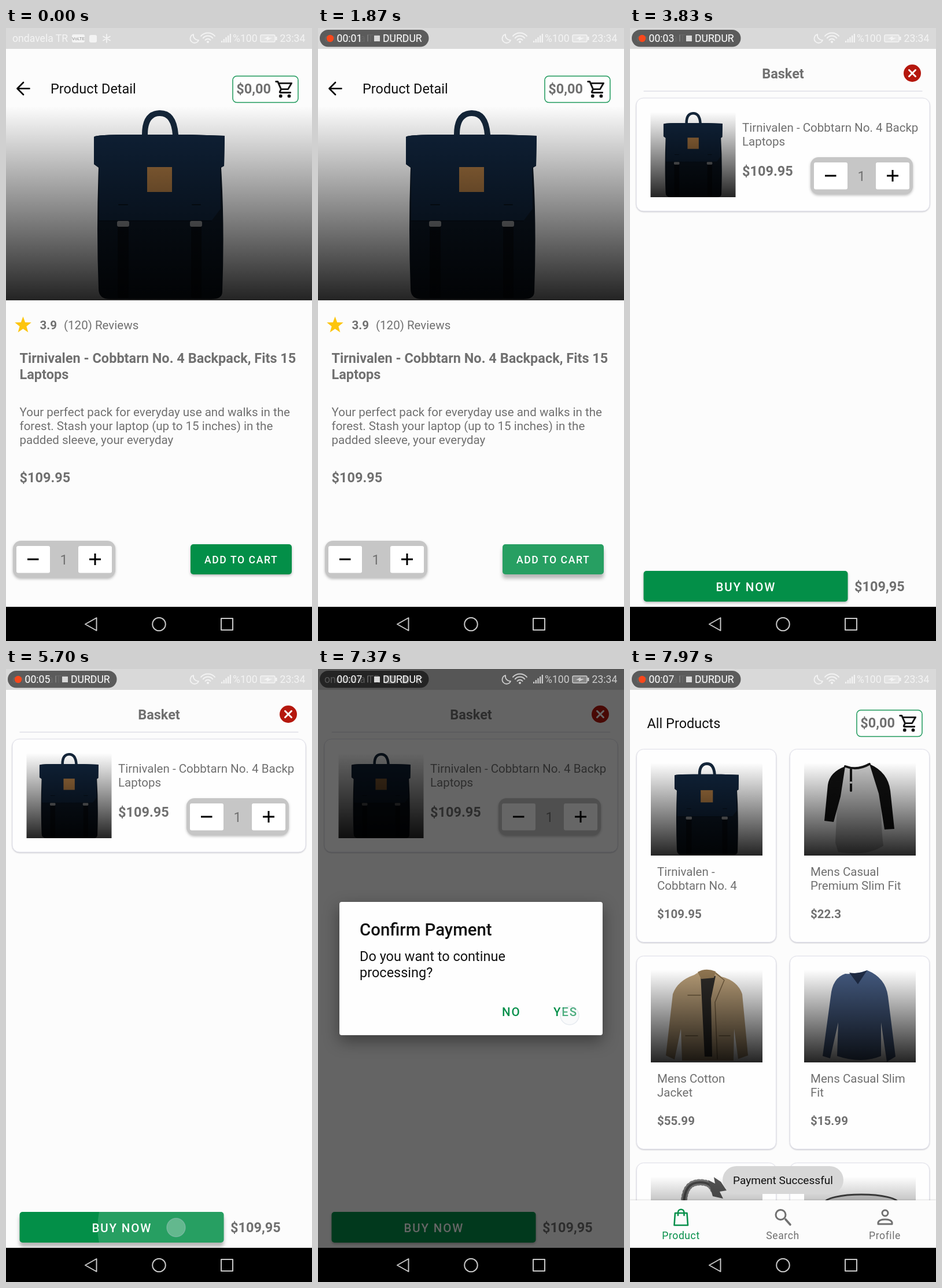
These frames come from a looping animation (529x1058 px, 8 s). An HTML page:

```html
<!DOCTYPE html>
<html lang="en">
<head>
<meta charset="utf-8">
<title>Shop checkout</title>
<style>
html, body { margin: 0; width: 100%; height: 100%; overflow: hidden; background: #000; }
svg { display: block; width: 529px; height: 1058px; font-family: Roboto, sans-serif; }
text { fill: #707070; white-space: pre; }
.b { font-weight: 700; }
.m { font-weight: 500; }
.dark { fill: #111; }
.green { fill: #07904b; }
.white { fill: #fff; }
.line { fill: none; stroke-linecap: round; stroke-linejoin: round; }
.card { fill: #fefefe; stroke: #e0e0ea; filter: drop-shadow(0 1px 1px rgba(0,0,30,.22)); }
.raised { filter: drop-shadow(0 2px 2px rgba(0,0,0,.25)); }
</style>
</head>
<body>
<svg id="stage" viewBox="0 0 529 1058"></svg>
<script>
const LOOP = 8000;
const SP = 1.469; // pixels per text unit
const BRAND = 'Tirnivalen', MODEL = 'Cobbtarn No. 4';

const text = (x, y, sp, str, attrs = '') =>
  `<text x="${x}" y="${y}" font-size="${sp * SP}" ${attrs}>${str}</text>`;
const rect = (x, y, w, h, r, attrs = '') =>
  `<rect x="${x}" y="${y}" width="${w}" height="${h}" rx="${r}" ${attrs}/>`;
const line = (d, color, width, attrs = '') =>
  `<path class="line" d="${d}" stroke="${color}" stroke-width="${width}" ${attrs}/>`;
const shape = (d, fill) => `<path d="${d}" fill="${fill}"/>`;
const circle = (x, y, r, attrs) => `<circle cx="${x}" cy="${y}" r="${r}" ${attrs}/>`;
const use = (id, transform) => `<use href="#${id}" transform="${transform}"/>`;
const shade = (x, y, w, h) => rect(x, y, w, h, 0, 'fill="url(#shade)"');
const page = (id, body) => `<g id="${id}">${rect(0, 0, 529, 999, 0, 'fill="#fcfcfc"')}${body}</g>`;

const button = (id, x, y, w, h, label, sp, lx, ly) => `
  <clipPath id="${id}Clip">${rect(x, y, w, h, 5)}</clipPath>
  ${rect(x, y, w, h, 5, `id="${id}" fill="#038f48"`)}
  <g clip-path="url(#${id}Clip)"><circle id="${id}Ripple" fill="#fff"/></g>
  ${text(lx, ly, sp, label, `class="m white" letter-spacing="${sp * SP * .0892}"`)}`;

const cartBox = (id, total) => `
  ${rect(392, 83, 113, 45.5, 7, `id="${id}Box" fill="#fefefe" stroke="#1c985a" stroke-width="1.5"`)}
  ${text(458, 113, 16, total, `id="${id}Total" class="b" text-anchor="end"`)}
  <g transform="translate(464.5 88) scale(1.469)">
    ${line('M1.5 3H3.6L7.5 12H15.7L19.8 5H4.7M7.5 12L6 15.2Q6 16 7 16H18.5', '#151515', 2)}
    ${circle(7, 20, 2, 'fill="#151515"')}${circle(17, 20, 2, 'fill="#151515"')}
  </g>`;

const star = Array.from({ length: 10 }, (_, i) => {
  const r = i % 2 ? 6.2 : 15, a = i * Math.PI / 5;
  return `${29.5 + r * Math.sin(a)},${513 - r * Math.cos(a)}`;
}).join(' ');

const productCard = (x, y, art, first = '', second = '', price = '') => `
  <g transform="translate(${x} ${y})">
    ${rect(.5, .5, 241, 333, 12, 'class="card"')}
    ${art}${shade(25, 24, 193, 160)}
    ${text(36, 219, 14, first)}${text(36, 243, 14, second)}
    ${text(36, 292, 14, price, 'class="b"')}
  </g>`;

// Product pictures, in card coordinates.
const bagArt = use('bag', 'translate(-8.6 -46.7) scale(.491)');
const raglanArt =
  shape('M96 30Q116 37 138 26L160 42Q156 122 162 167Q134 186 84 178L79 162L84 52Z', '#c6c6c6') +
  shape('M96 30Q69 40 66 62L60 124L76 126L88 82Z', '#101010') +
  shape('M138 26Q170 40 174 72L181 138L164 139L154 77Z', '#101010') +
  line('M96 30Q117 38 138 26M106 35V72', '#151515', 4) + circle(106, 58, 2, 'fill="#ddd"');
const jacketArt =
  shape('M100 33Q119 20 137 28L147 36Q175 43 183 66L193 172L176 178L169 126L168 181H79L77 126L66 179L51 172L63 66Q71 43 100 33Z', '#b49a75') +
  shape('M111 32L137 35L129 74L131 174H118Z', '#2c2a27') +
  shape('M106 28Q120 20 137 27L134 38L112 40Z', '#8f7551') +
  line('M137 30L152 42L136 80L140 178M89 68H111M85 138H106M143 138H162', '#705b3e', 1.5);
const sweaterArt =
  shape('M96 31Q116 32 134 25Q166 38 170 70L183 174L168 183L158 115V173Q124 187 82 173L84 115L70 177L57 173L71 70Q74 38 96 31Z', '#43597e') +
  shape('M103 29L118 49L134 25Q118 32 103 29Z', '#1f2c45');
const braceletArt =
  line('M82 75C82 45 92 34 110 34S130 42 134 48', '#777', 11, 'stroke-dasharray="1 5"') +
  line('M82 75C82 45 92 34 110 34S130 42 134 48', '#444', 4) +
  shape('M124 30L136 36L134 25L146 33L156 48L144 50L150 62L132 58Z', '#555');
const ringArt = '<ellipse cx="124" cy="70" rx="64" ry="15" fill="#ddd" stroke="#444" stroke-width="3"/>';

const defs = `<defs>
  <linearGradient id="shade" x2="0" y2="1">
    <stop stop-opacity="0"/><stop offset="1" stop-opacity=".86"/>
  </linearGradient>
  <g id="bag">
    ${line('M240 184Q240 148 265 147T293 184', '#14263a', 10)}
    ${shape('M152 188Q155 184 218 184H316L378 186L377 238L372 241Q378 340 374 455Q374 468 355 468H180Q160 468 160 450Q156 350 160 241L152 235Z', '#0c1724')}
    ${shape('M152 188Q155 184 218 184H316L378 186L377 238L370 241L371 312L355 333H161V241L152 235Z', '#10233a')}
    ${line('M161 333H355M195 305H210M322 305H336', '#08111c', 2)}
    ${rect(193, 342, 19, 124, 2, 'fill="#070c13"')}${rect(320, 342, 18, 124, 2, 'fill="#070c13"')}
    ${rect(192, 333, 21, 10, 3, 'fill="#87898c"')}${rect(318, 333, 21, 10, 3, 'fill="#87898c"')}
    ${rect(244, 240, 43, 43, 0, 'fill="#a2723f"')}
  </g>
  <g id="stepper">
    ${rect(12, 885, 177, 64, 14, 'fill="#c6c6c6" class="raised"')}
    ${rect(18, 894, 58, 46.5, 3, 'class="white"')}${rect(125, 894, 58, 46.5, 3, 'class="white"')}
    ${line('M37 917H56.5M144 917H164M154 907V927', '#000', 3, 'style="stroke-linecap:butt"')}
    ${text(100, 926, 16, '1', 'text-anchor="middle"')}
  </g>
</defs>`;

const detail = page('detail', `
  ${line('M40.5 104.5H20M30 94L19.5 104.5L30 115', '#000', 2.7)}
  ${text(77, 113, 16, 'Product Detail', 'class="dark"')}
  ${use('bag', '')}${shade(0, 135, 529, 335)}
  ${cartBox('cart', '$0,00')}
  <polygon points="${star}" fill="#fdc50d"/>
  ${text(58.5, 520, 14, '3.9', 'class="b"')}${text(100, 520, 14, '(120) Reviews')}
  ${text(23.5, 578, 16, `${BRAND} - ${MODEL} Backpack, Fits 15`, 'class="b"')}
  ${text(23.5, 606, 16, 'Laptops', 'class="b"')}
  ${text(23.5, 670, 14, 'Your perfect pack for everyday use and walks in the')}
  ${text(23.5, 694, 14, 'forest. Stash your laptop (up to 15 inches) in the')}
  ${text(23.5, 718, 14, 'padded sleeve, your everyday')}
  ${text(23.5, 784, 16, '$109.95', 'class="b"')}
  ${use('stepper', '')}
  ${button('add', 319, 891, 175, 52, 'ADD TO CART', 12, 343, 924)}`);

const basket = page('basket', `
  ${text(264.5, 87, 16, 'Basket', 'class="b" text-anchor="middle"')}
  ${circle(488, 78, 15, 'fill="#b5170d"')}${line('M482.5 72.5L493.5 83.5M493.5 72.5L482.5 83.5', '#fff', 3)}
  ${line('M24 109H505', '#dfdfe7', 1.5)}
  ${rect(11, 121, 507, 195, 12, 'class="card"')}
  ${use('bag', 'translate(-10.6 81) scale(.451)')}${shade(35.5, 145, 147, 147)}
  ${text(194, 179, 14, `${BRAND} - ${MODEL} Backp`)}${text(194, 203, 14, 'Laptops')}
  ${text(194, 255, 16, '$109.95', 'class="b"')}
  ${use('stepper', 'translate(300 -662)')}
  ${button('buy', 23.5, 937, 353, 53, 'BUY NOW', 14, 148.5, 972)}
  ${text(388, 972, 16, '$109,95', 'class="b"')}`);

const products = page('products', `
  ${text(29.5, 102, 16, 'All Products', 'class="dark"')}
  <g transform="translate(0 -12)">${cartBox('home', '$0,00')}</g>
  ${productCard(11, 138, bagArt, BRAND + ' -', MODEL, '$109.95')}
  ${productCard(276, 138, raglanArt, 'Mens Casual', 'Premium Slim Fit', '$22.3')}
  ${productCard(11, 495, jacketArt, 'Mens Cotton', 'Jacket', '$55.99')}
  ${productCard(276, 495, sweaterArt, 'Mens Casual Slim', 'Fit', '$15.99')}
  ${productCard(11, 852, braceletArt)}${productCard(276, 852, ringArt)}
  ${rect(0, 917, 529, 82, 0, 'fill="#fcfcfc" style="filter:drop-shadow(0 -1px 1px rgba(0,0,0,.12))"')}
  ${line('M78 939H98.500L100 960H76.500ZM83 943V938A5 5 0 0 1 93.500 938V943', '#07904b', 2.6)}
  ${line('M269 950L277 959', '#707070', 3.6)}${circle(260.5, 942, 8.500, 'fill="none" stroke="#707070" stroke-width="3"')}
  ${circle(441, 939, 5, 'fill="none" stroke="#707070" stroke-width="3"')}
  ${line('M429 958V955Q431 950 441 950T453 955V958Z', '#707070', 3)}
  ${[[88, 'Product', 'green'], [264, 'Search', ''], [440.5, 'Profile', '']].map(([x, label, cls]) =>
    text(x, 984, 12, label, `class="${cls}" text-anchor="middle" letter-spacing=".55"`)).join('')}`);

const dialog = `<g id="dialog">
  ${rect(37, 402, 455, 230, 4, 'fill="#fefefe" style="filter:drop-shadow(0 10px 14px rgba(0,0,0,.4))"')}
  ${text(72, 460, 20, 'Confirm Payment', 'class="m dark"')}
  ${text(72, 504, 16, 'Do you want to continue', 'class="dark"')}${text(72, 532, 16, 'processing?', 'class="dark"')}
  ${text(318, 599, 14, 'NO', 'class="m green" letter-spacing="1.83"')}
  ${text(407, 599, 14, 'YES', 'class="m green" letter-spacing="1.83"')}
</g>`;

const toast = `<g id="toast">
  ${rect(160, 858, 209, 48, 24, 'fill="#d7d7d7"')}
  ${text(264.5, 889, 13, 'Payment Successful', 'class="dark" text-anchor="middle"')}
</g>`;

const arc = r => `M${349 - r * .75} ${25 - r * .7}A${r} ${r} 0 0 1 ${349 + r * .75} ${25 - r * .7}`;
const status = `<g opacity=".7">
  ${text(11, 24, 12, 'ondavela TR', 'class="white"')}
  ${rect(114, 11, 22, 14, 3, 'class="white"')}
  <text x="125" y="21" font-size="8" text-anchor="middle">VoLTE</text>
  ${rect(144, 12, 13, 13, 3, 'class="white"')}
  ${line('M174 11V25M168 14.500L180 21.500M180 14.500L168 21.500', '#fff', 1.8)}
  ${line('M324 11A7.500 7.500 0 1 0 333 21A8.500 8.500 0 0 1 324 11Z', '#fff', 1.8)}
  ${line(arc(6) + arc(11) + arc(16), '#fff', 2)}${circle(349, 24, 2, 'class="white"')}
  ${[0, 1, 2, 3, 4].map(i => rect(372 + i * 3.7, 22 - i * 3, 2.2, 3 + i * 3, 0, 'class="white"')).join('')}
  ${text(392, 24, 12, '%100', 'class="white"')}
  ${rect(440, 12, 25, 12, 2, 'fill="#fff" fill-opacity=".4" stroke="#fff" stroke-width="1.5"')}
  ${rect(466, 15, 2.500, 6, 0, 'class="white"')}${shape('M446 19L454 14V17H460L451 22V19Z', '#fff')}
  ${text(473.5, 24, 12, '23:34', 'class="white"')}
</g>`;

const pill = `<g id="pill">
  ${rect(3, 3, 188.500, 29.500, 14.700, 'fill-opacity=".58"')}
  ${circle(21, 18, 6.200, 'id="recDot" fill="#f8481c"')}
  ${text(32.5, 24, 12, '', 'id="clock" class="white"')}
  ${line('M86 12V23', '#999', 1)}${rect(97, 13, 10, 10, 0, 'fill="#d8d8d8"')}
  ${text(112, 24, 12, 'DURDUR', 'class="white"')}
</g>`;

const systemBar = rect(0, 999, 529, 59, 0) +
  line('M137 1029L156.500 1018V1040ZM372 1019H392V1039H372Z', '#c8c8c8', 2) +
  circle(264.5, 1029, 11.300, 'fill="none" stroke="#c8c8c8" stroke-width="2"');

document.getElementById('stage').innerHTML = defs + detail + basket + products +
  rect(0, 0, 529, 36, 0, 'fill="#d9d9d9"') + rect(0, 0, 529, 999, 0, 'id="dim"') +
  dialog + toast + status + pill + systemBar +
  circle(0, 0, 16, 'id="touch" fill="#f0f2f4" fill-opacity=".3" stroke="#bcc8d8" stroke-opacity=".35" stroke-width="1.5"');

const el = Object.fromEntries([...document.querySelectorAll('[id]')].map(e => [e.id, e]));
const set = (e, attrs) => { for (const k in attrs) e.setAttribute(k, attrs[k]); };
const ramp = (t, from, to) => Math.min(1, Math.max(0, (t - from) / (to - from)));
const ease = k => k * k * (3 - 2 * k);
const fade = (t, from, to) => ease(ramp(t, from, to));
const show = (e, opacity) => set(e, { opacity, visibility: opacity > 0 ? 'visible' : 'hidden' });

const taps = [
  { x: 405, y: 920, down: 1450, up: 1780, button: 'add' },
  { x: 455, y: 107, down: 3300, up: 3420 },
  { x: 294, y: 964, down: 5440, up: 5780, button: 'buy' },
  { x: 435, y: 598, down: 7230, up: 7400 },
];

function press({ x, y, down, up, button }, t) {
  const pressed = ramp(t, down, down + 100) * (1 - ramp(t, up + 130, up + 300));
  set(el[button + 'Ripple'], {
    cx: x, cy: y, r: Math.max(0, (t - down) * .52),
    opacity: t < down ? 0 : .14 * (1 - ramp(t, up + 130, up + 300)),
  });
  el[button].style.filter =
    `drop-shadow(0 ${2 + 5 * pressed}px ${2 + pressed}px rgba(0,0,0,.28))`;
}

function draw(now) {
  const t = now % LOOP;

  const total = t < 1960 ? '$0,00' : '$109,95';
  el.cartTotal.textContent = total;
  set(el.cartBox, t < 1960 ? { x: 392, width: 113 } : { x: 364, width: 141 });

  show(el.basket, fade(t, 3470, 3800));
  show(el.products, fade(t, 7580, 7790));

  const opened = fade(t, 5850, 6110);
  const scale = .9 + .1 * opened;
  show(el.dialog, opened * (1 - fade(t, 7410, 7510)));
  set(el.dialog, { transform: `translate(264.5 517) scale(${scale}) translate(-264.5 -517)` });
  show(el.dim, .6 * opened * (1 - fade(t, 7400, 7590)));
  show(el.toast, fade(t, 7490, 7700));

  const recTime = Math.max(0, t - 50);
  show(el.pill, ramp(t, 30, 230));
  show(el.recDot, recTime % 1000 >= 500 ? 1 : 0);
  el.clock.textContent = '00:0' + Math.floor(recTime / 1000);

  taps.filter(tap => tap.button).forEach(tap => press(tap, t));
  const tap = taps.find(({ down, up }) => t >= down && t < up);
  show(el.touch, tap ? 1 : 0);
  if (tap) set(el.touch, { cx: tap.x, cy: tap.y });

  requestAnimationFrame(draw);
}
requestAnimationFrame(draw);
</script>
</body>
</html>
```
